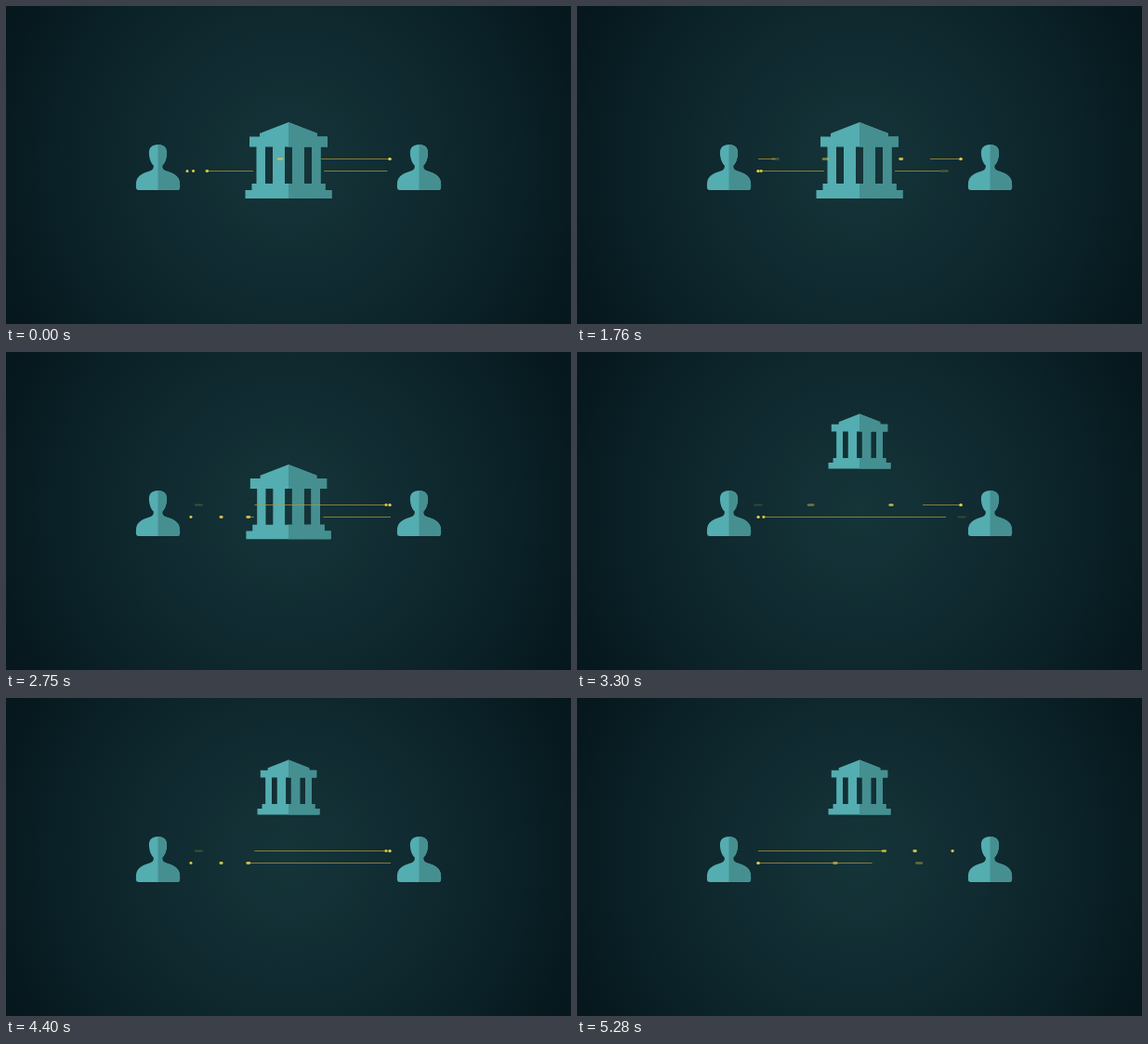
These frames come from a looping animation (608 px wide and 342 px high, 5.39 s). An HTML page with a canvas:

```html
<!DOCTYPE html>
<html lang="en">
<head>
<meta charset="utf-8">
<title>Transfers</title>
<style>
  html, body { margin: 0; width: 100%; height: 100%; overflow: hidden; background: #07191e; }
  canvas { display: block; width: 100vw; height: 100vh; }
</style>
</head>
<body>
<canvas id="stage" width="608" height="342"></canvas>
<script>
const ctx = document.getElementById('stage').getContext('2d');
const W = 608, H = 342, MID = 304;
const STEP = 110, LOOP = 5390;
const PAUSES = [13, 27, 37];        // ticks on which nothing moves
const CYCLE = 13, TRAVEL = 10.4;    // in ticks
const LIGHT = '#54adb0', DARK = '#458f91';
const LINE = 'rgba(178,155,58,0.72)', DOT = '#dcc44c';

const clamp = (x, a = 0, b = 1) => Math.min(b, Math.max(a, x));
const easeOut = t => 1 - (1 - t) ** 2;
const easeIn = t => t * t;
const easeInOut = t => t < 0.5 ? 4 * t ** 3 : 1 - 4 * (1 - t) ** 3;

// Three dots leave one person; the last one draws a line, whose tail follows.
const STARTS = [10.7, 13.55, 15];
const upper = { y: 164.5, from: 195, to: 413, delay: 0, tail: 22.1, tailEase: easeOut, end: 30.9 };
const lower = { y: 177.5, from: 414, to: 195, delay: 4.3, tail: 25.1, tailEase: easeIn, end: 35.5 };

const glow = ctx.createRadialGradient(MID, 171, 0, MID, 171, 330);
glow.addColorStop(0, '#153539');
glow.addColorStop(0.4, '#102b31');
glow.addColorStop(0.75, '#0a2127');
glow.addColorStop(1, '#06181d');

// A symmetric figure, light on the left and dark on the right.
function figure(half) {
  const full = new Path2D(half);
  full.addPath(half, new DOMMatrix([-1, 0, 0, 1, 0, 0]));
  return { half, full };
}

const person = figure(new Path2D(
  'M0 0 C6.5 0 9.8 3.5 9.6 9.5 C9.4 15 7.5 20 4.7 22.5 C4.5 26 5.5 27.3 9 28.5 ' +
  'C17 31 23.6 33.5 23.6 43 V46 Q23.6 49 20.5 49 H0 Z'));
const bank = figure(new Path2D(
  'M0 0 L31 12 V15.5 H42 V26.5 H34.5 V66 H39.5 V73 H46.5 V82 H0 V66 ' +
  'H4 V26.5 H0 Z M17 26.5 V66 H25 V26.5 Z'));

function drawFigure({ half, full }, x, y, scale = 1) {
  ctx.save();
  ctx.translate(x, y);
  ctx.scale(scale, scale);
  ctx.fillStyle = LIGHT;
  ctx.fill(full, 'evenodd');
  ctx.fillStyle = DARK;
  ctx.fill(half, 'evenodd');
  ctx.restore();
}

// Young, fast dots are longer and fainter.
function drawDot(x, y, age) {
  const rest = (1 - clamp(age / TRAVEL)) ** 2;
  const r = 1.5 + 3.2 * rest, h = 1.5 - 0.4 * rest;
  ctx.globalAlpha = clamp(0.25 + age * 0.25) * (1 - 0.3 * rest);
  ctx.fillStyle = DOT;
  ctx.beginPath();
  ctx.roundRect(x - r, y - h, 2 * r, 2 * h, h);
  ctx.fill();
  ctx.globalAlpha = 1;
}

function drawLane(lane, tick) {
  const place = (age, ease) => lane.from + (lane.to - lane.from) * ease(clamp(age / TRAVEL));
  for (let t = tick % CYCLE; t < lane.end; t += CYCLE) {
    const ages = STARTS.map(s => t - s - lane.delay);
    if (ages[2] > 0) {
      const head = place(ages[2], easeOut), tail = place(t - lane.tail, lane.tailEase);
      ctx.fillStyle = LINE;
      ctx.fillRect(Math.min(head, tail), lane.y - 0.5, Math.abs(head - tail), 1);
    }
    for (const age of ages) {
      if (age >= 0) drawDot(place(age, easeOut), lane.y, age);
    }
  }
}

function draw(ms) {
  const n = Math.floor((ms % LOOP) / STEP);
  const step = n - PAUSES.filter(p => p <= n).length;
  const tick = step + 0.45 * clamp((24 - step) / 9);
  const lift = easeInOut(clamp((step - 22.6) / 5.4));
  const scale = 1 - 0.28 * lift, top = 125 - 58.5 * lift;

  ctx.fillStyle = glow;
  ctx.fillRect(0, 0, W, H);
  drawFigure(person, 163.5, 149);
  drawFigure(person, 444.5, 149);

  // The lower lane passes out of sight inside the building.
  ctx.save();
  if (top + 82 * scale > lower.y) {
    const w = 38 * scale;
    ctx.beginPath();
    ctx.rect(0, 0, MID - w, H);
    ctx.rect(MID + w, 0, W, H);
    ctx.clip();
  }
  drawLane(lower, tick);
  ctx.restore();

  drawFigure(bank, MID, top, scale);
  drawLane(upper, tick);
}

const start = performance.now();
function frame() {
  draw(performance.now() - start);
  requestAnimationFrame(frame);
}
frame();
</script>
</body>
</html>
```
